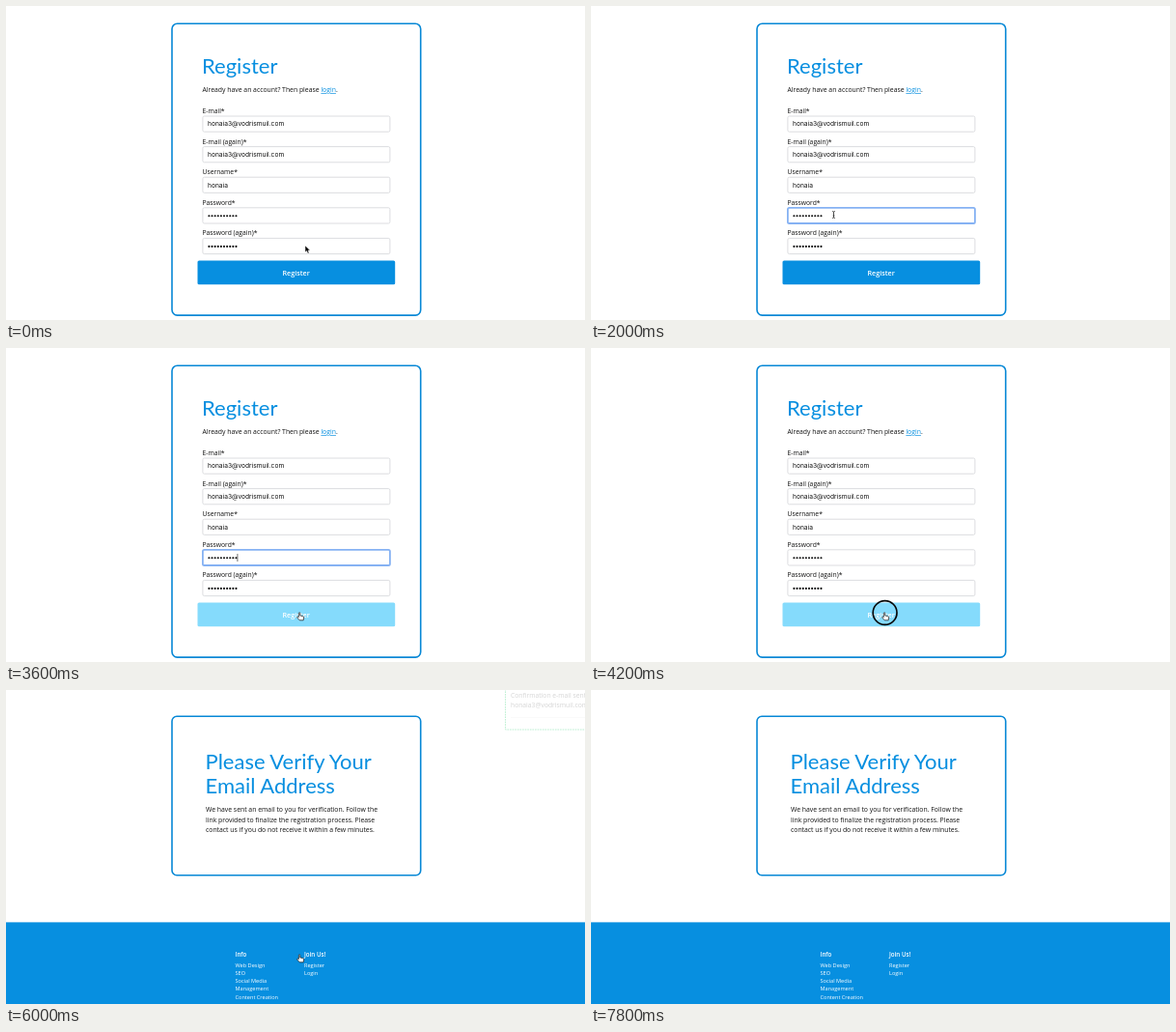
Write an HTML page that moves like this. It is 600 by 325 pixels and loops after 8 s.

```html
<!DOCTYPE html>
<html lang="en">
<head>
<meta charset="utf-8">
<title>Register</title>
<style>
  html, body { margin: 0; width: 100%; height: 100%; overflow: hidden; background: #fff; }
  svg { display: block; width: 100vw; height: 100vh; }
  text { font: 6.85px "Open Sans", sans-serif; fill: #111; }
  .title { font: 22px Lato, sans-serif; fill: #078fe0; }
  .label { font-size: 6.75px; }
  .value { font: 6.65px Inter, sans-serif; }
  .link { fill: #078fe0; text-decoration: underline; }
  .card { fill: #fff; stroke: #0788d6; stroke-width: 1.6; }
  .blue { fill: #078fe0; }
  .input { fill: #fff; stroke: #d9dadd; stroke-width: .9; }
  .input.focus { stroke: #86b2f3; stroke-width: 1.8; }
  .dots { stroke: #111; stroke-width: 2.1; stroke-linecap: round; stroke-dasharray: 0 3.12; }
  .button { font-size: 7.2px; font-weight: 600; fill: #fff; text-anchor: middle; }
  .menu { font-size: 5.6px; fill: #fff; }
  .head { font-size: 6.2px; font-weight: 600; fill: #fff; }
  #toast text { fill: #999; font-size: 6.75px; }
  #ring { fill: none; stroke: #080808; stroke-width: 1.7; }
</style>
</head>
<body>
<svg viewBox="0 0 600 325" preserveAspectRatio="none">
  <g id="form">
    <rect class="card" x="172" y="18.3" width="257.7" height="301.8" rx="5.5"/>
    <text class="title" x="203" y="70">Register</text>
    <text x="203.5" y="89">Already have an account? Then please <tspan class="link">login</tspan>.</text>
    <g id="fields"></g>
    <path id="caret" d="M239.9 213v8" stroke="#333" stroke-width=".7"/>
    <rect id="button" x="198.5" y="263.5" width="204.7" height="24.8" rx="1.6"/>
    <text class="button" x="300.6" y="278.7">Register</text>
  </g>

  <g id="verify">
    <rect class="card" x="172" y="27.3" width="257.7" height="164.4" rx="5"/>
    <text class="title" x="206.5" y="82.3">Please Verify Your</text>
    <text class="title" x="206.5" y="107">Email Address</text>
    <text x="207" y="126.4">We have sent an email to you for verification. Follow the</text>
    <text x="207" y="136.6">link provided to finalize the registration process. Please</text>
    <text x="207" y="146.8">contact us if you do not receive it within a few minutes.</text>
    <rect class="blue" y="240.4" width="600" height="85"/>
    <g id="footer"></g>
    <g id="toast">
      <rect x=".5" y="-6" width="94" height="47" fill="#fff" stroke="#42d583" stroke-width=".9" stroke-dasharray="1.6 1"/>
      <path d="M6 28.5h82" stroke="#eee" stroke-width=".6"/>
      <text x="6" y="8.2">Confirmation e-mail sent to</text>
      <text x="6" y="18.4">honaia3@vodrismuil.com.</text>
    </g>
  </g>

  <g id="pointer">
    <circle id="ring"/>
    <path id="arrow" d="M0 0v6.8l1.6-1.4 1.1 2.6 1.4-.6-1.1-2.5h2.2z" fill="#000" stroke="#fff" stroke-width=".5"/>
    <path id="beam" d="M-1.3-3.5Q0-3.5 0-2.5V2.5Q0 3.5-1.3 3.5M1.3-3.5Q0-3.5 0-2.5M0 2.5Q0 3.5 1.3 3.5M-.9 1h1.8" fill="none" stroke="#222" stroke-width=".8"/>
    <path id="hand" d="M-1.2 4.5V.6Q-1.2-.3-.5-.3T.2.6V3l3 .6q1 .3.9 1.3l-.5 2.9h-4L-2.8 5.1q-.3-1 .5-1z" fill="#fff" stroke="#222" stroke-width=".75"/>
  </g>
</svg>
<script>
const LOOP = 8000, STEP = 200;
const $ = id => document.getElementById(id);
const show = (id, on) => $(id).style.display = on ? "" : "none";
const clamp = v => Math.min(1, Math.max(0, v));
const ease = v => v * v * (3 - 2 * v);

const email = "honaia3@vodrismuil.com";
const fields = [
  ["E-mail*", email], ["E-mail (again)*", email], ["Username*", "honaia"],
  ["Password*"], ["Password (again)*"]
];
$("fields").innerHTML = fields.map(([label, value], i) => {
  const y = 122 + i * 31.6;
  const content = value
    ? `<text class="value" x="209" y="${y + 2.4}">${value}</text>`
    : `<path class="dots" d="M210.4 ${y + .5}h28.3"/>`;
  return `<text class="label" x="203.5" y="${y - 11}">${label}</text>
    <rect class="input" x="203.9" y="${y - 8}" width="194" height="16.2" rx="1.6"/>${content}`;
}).join("");
const inputs = document.querySelectorAll(".input");

const menus = [
  [237.5, "Info", "Web Design", "SEO", "Social Media", "Management", "Content Creation"],
  [309, "Join Us!", "Register", "Login"]
];
$("footer").innerHTML = menus.map(([x, head, ...items]) =>
  `<text class="head" x="${x}" y="275.9">${head}</text>` +
  items.map((item, i) => `<text class="menu" x="${x}" y="${286.8 + i * 8.2}">${item}</text>`).join("")
).join("");

// Pointer keys: time, x, y
const path = [[0, 310, 248], [600, 310, 248], [1100, 251.5, 216], [2200, 251.5, 216],
  [3200, 304, 260.5], [3600, 304.6, 274]];
const clicks = [400, 1200, 4000];

function pointerAt(t) {
  const next = path.findIndex(key => key[0] > t);
  if (next < 0) return path.at(-1).slice(1);
  const [t0, x0, y0] = path[next - 1], [t1, x1, y1] = path[next];
  const k = ease((t - t0) / (t1 - t0));
  return [x0 + (x1 - x0) * k, y0 + (y1 - y0) * k];
}

function render(t) {
  const verified = t >= 6000, hover = t >= 3400;
  show("form", !verified);
  show("verify", verified);

  const focus = t < 400 || t >= 4000 ? -1 : t < 1400 ? 4 : 3;
  inputs.forEach((input, i) => input.classList.toggle("focus", i === focus));
  show("caret", t >= 1200 && t < 4000 && (t - 1200) % 1000 < 600);
  $("button").setAttribute("fill", hover ? "#85dbfc" : "#078fe0");

  const shown = Math.min(clamp((t - 5800) / 500), clamp((7800 - t) / 400));
  $("toast").setAttribute("transform", `translate(${517 - 17 * clamp((shown - .4) / .6)} 0)`);
  $("toast").setAttribute("opacity", shown);

  const [x, y] = pointerAt(t);
  $("pointer").setAttribute("transform", `translate(${x} ${y})`);
  show("pointer", t < 7400);
  const overInput = t >= 200 && t < 2600 && (y > 240 || y < 225);
  show("hand", hover);
  show("beam", overInput);
  show("arrow", !hover && !overInput);

  const click = clicks.find(c => t >= c && t < c + 400);
  show("ring", click !== undefined);
  if (click !== undefined) $("ring").setAttribute("r", t < click + 200 ? 6.6 : 12.4);
}

function frame(now) {
  render(Math.floor(now % LOOP / STEP) * STEP);
  requestAnimationFrame(frame);
}
requestAnimationFrame(frame);
</script>
</body>
</html>
```
